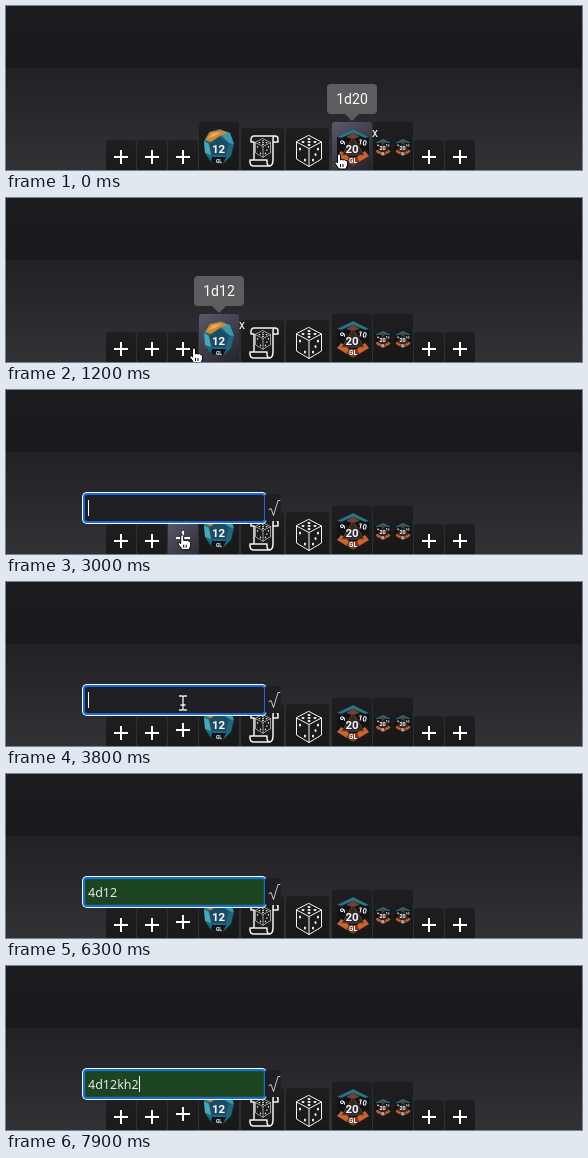
An HTML page for the animation above (8 s loop, 576 px wide and 164 px high).

```html
<!DOCTYPE html>
<html lang="en">
<head>
<meta charset="utf-8">
<title>Dice bar</title>
<style>
html, body { margin: 0; width: 100%; height: 100%; overflow: hidden; background: #1b1a1f; }
svg { display: block; width: 576px; height: 164px; font-family: Roboto, sans-serif; fill: #fff; }
.line { fill: none; stroke: #f4f4f4; stroke-linejoin: round; stroke-linecap: round; }
.num { font-weight: 700; text-anchor: middle; }
#typed { font: 12.5px "Noto Sans", sans-serif; }
</style>
</head>
<body>
<svg viewBox="0 0 576 164">
  <defs>
    <linearGradient id="top" x2="0" y2="1"><stop stop-color="#1c1b20"/><stop offset="1" stop-color="#1a191e"/></linearGradient>
    <linearGradient id="low" x2="0" y2="1"><stop stop-color="#212025"/><stop offset="1" stop-color="#323136"/></linearGradient>
    <linearGradient id="dark" x2="0" y2="1"><stop stop-color="#1f1f21"/><stop offset="1" stop-color="#161617"/></linearGradient>
    <linearGradient id="lit" x2=".5" y2="1"><stop stop-color="#5a596b"/><stop offset="1" stop-color="#25242d"/></linearGradient>

    <g id="plus"><path d="M-7 0H7M0-7V7" stroke="#fff" stroke-width="2"/></g>

    <g id="cube">
      <path class="line" d="M0-15.500 12.500-9V8L0 15.500-12.500 8V-9ZM-12.500-9 0-2.500 12.500-9M0-2.500V15.500"/>
      <ellipse cy="-9" rx="1.500" ry=".9"/><ellipse cx="-6" cy="-9" rx="1.500" ry=".9"/><ellipse cx="6" cy="-9" rx="1.500" ry=".9"/>
      <ellipse cy="-12" rx="1.500" ry=".9"/><ellipse cy="-6" rx="1.500" ry=".9"/>
      <ellipse cx="-9" cy="-2" rx="1" ry="1.500"/><ellipse cx="-4" cy="9" rx="1" ry="1.500"/>
      <ellipse cx="9" cy="-2" rx="1" ry="1.500"/><ellipse cx="6.500" cy="3.500" rx="1" ry="1.500"/><ellipse cx="4" cy="9" rx="1" ry="1.500"/>
    </g>

    <g id="scroll">
      <path class="line" stroke-width="1.500" d="M-9-8H-12V-10Q-12-14-9-14H12Q15-14 15-11V-8H10V10Q10 16 6 16H-9Q-13 16-13 12V10H4V12Q4 16 7 16M-9-8V10M10-8V-11Q10-14 12-14"/>
      <use href="#cube" transform="translate(0 -2) scale(.6)"/>
    </g>

    <g id="d12">
      <path fill="#20657c" d="M-9-15 1-18 12-14 16-3 13 9 5 17-7 15-13 6-14-6Z"/>
      <path fill="#3b98ae" d="M1-18 12-14 16-3 11-4 4-11Z"/>
      <path fill="#4aa5b8" d="M-14-6-9-3-7 8-13 6Z"/>
      <path fill="#d58531" d="M-13-7-8-15 2-17 10-14 2-11-7-5Z"/>
      <path fill="#e8b05c" d="M-10-9-5-14 3-15-3-11Z"/>
      <path fill="#1a4d63" d="M1-10 11-4 8 8-6 8-9-3Z"/>
      <path fill="#10171d" d="M-6 10 8 10 5 17-7 15Z"/>
      <text class="num" y="6" x=".5" font-size="11.500">12</text>
      <text class="num" y="15.500" x="1" font-size="5">GL</text>
    </g>

    <g id="d20">
      <path fill="#121317" d="M0-19 16-11V8L0 18-16 8V-11Z"/>
      <path fill="#2b7285" d="M0-19 16-11 12-10 0-15-12-10-16-11Z"/>
      <path fill="#6b4436" d="M0-15 7-11 0-9-7-11Z"/>
      <path fill="#c9642c" d="M-16 8-12 3-4 9-6 14ZM16 8 12 3 4 9 6 14Z"/>
      <path fill="#7c3d27" d="M-6 14-4 9H4L6 14 0 18Z"/>
      <path fill="#30262a" d="M0-11 11 7H-11Z"/>
      <path fill="none" stroke="#8a4a32" stroke-width=".7" d="M0-11 11 7H-11Z"/>
      <text class="num" x="-1" y="4.500" font-size="11.500">20</text>
      <text class="num" font-size="7.500" transform="translate(-8 -4) rotate(-60)">9</text>
      <text class="num" font-size="7.500" transform="translate(9 -3) rotate(12)">10</text>
      <text class="num" y="14.500" font-size="6.500">GL</text>
    </g>

    <g id="pair">
      <use href="#d20" transform="translate(-10) scale(.47)"/>
      <use href="#d20" transform="translate(10) scale(.47)"/>
    </g>
  </defs>

  <rect width="576" height="62" fill="url(#top)"/>
  <rect y="62" width="576" height="102" fill="url(#low)"/>
  <g id="bar"></g>

  <g id="tip">
    <path id="arrow" fill="#5d5d5f"/>
    <rect id="box" height="30" rx="4" fill="#5d5d5f"/>
    <text id="label" font-size="14" text-anchor="middle"/>
  </g>
  <text id="close" y="131" font-size="12" text-anchor="middle">x</text>

  <g id="entry">
    <g id="ring">
      <rect x="76" y="102" width="185" height="32" rx="5"/>
      <rect x="77" y="103" width="183" height="30" rx="4" fill="#176be0"/>
    </g>
    <rect id="field" x="79.500" y="105.500" width="178" height="25" rx="1.500"/>
    <rect x="259" y="104" width="16" height="27" rx="2" fill="#1f1f22"/>
    <path class="line" stroke-width=".8" d="M263 119.500 265 118.500 267.500 125.500 272 110.500H274"/>
    <text id="typed" x="82" y="123" fill="#e6e6e6"/>
    <rect id="caret" y="110" width="1" height="16"/>
  </g>

  <path id="hand" stroke="#000" stroke-width="1" stroke-linejoin="round"
    d="M-1.500 1Q0-1 1.500 1V6Q3 4.700 4 6 5.500 5 6.500 6.500 8.500 6 8.500 8V11L7 15H0L-4 9.500Q-4.500 7.500-2.800 7.800L-1.500 9ZM1.500 10V13M4 10V13"/>
  <path id="beam" class="line" stroke-width="1.300" d="M-3.500-7H-1Q0-7 0-6 0-7 1-7H3.500M0-6V6M-3.500 7H-1Q0 7 0 6 0 7 1 7H3.500M-2 2H2"/>
</svg>

<script>
const $ = id => document.getElementById(id);
const show = (id, on) => $(id).style.display = on ? "" : "none";
const set = (id, attrs) => { for (const k in attrs) $(id).setAttribute(k, attrs[k]); };
const clamp = v => Math.max(0, Math.min(1, v));

const LOOP = 8000, OPEN = 2500, FOCUS = 2600, TYPE = 4560;
const ADD = "Add new custom dice roll";

// left, top, width, icon, icon centre, tooltip
const tiles = [
  [100, 134, 30, "plus", 115, 151, ADD],
  [131, 134, 30, "plus", 146, 151, ADD],
  [162, 134, 30, "plus", 177, 151, ADD],
  [193, 116, 40, "d12", 212, 141, "1d12"],
  [235, 122, 43, "scroll", 257, 144],
  [280, 122, 43, "cube", 303, 145],
  [326, 116, 40, "d20", 347, 142, "1d20"],
  [367, 116, 40, "pair", 387, 142],
  [408, 134, 30, "plus", 423, 151, ADD],
  [439, 134, 30, "plus", 454, 151, ADD],
].map(([x, y, w, icon, cx, cy, tip]) => ({ x, y, w, icon, cx, cy, tip }));

$("bar").innerHTML = tiles.map((t, i) =>
  `<g id="tile${i}"><rect id="face${i}" x="${t.x}" y="${t.y}" width="${t.w}" height="60" rx="3"/>` +
  `<use href="#${t.icon}" transform="translate(${t.cx} ${t.cy})"/></g>`).join("");

// time, x, y of the pointer's hot spot
const path = [
  [0, 333, 148], [500, 215, 150], [700, 178, 152], [850, 181, 152],
  [1020, 201, 151], [1100, 197, 150], [1200, 188, 150], [1500, 177, 151],
  [2750, 176, 151], [3600, 177, 121],
];

function pointer(t) {
  const i = path.findIndex(p => p[0] > t);
  if (i < 0) return path[path.length - 1].slice(1);
  if (i === 0) return path[0].slice(1);
  const [t0, x0, y0] = path[i - 1], [t1, x1, y1] = path[i];
  const k = (t - t0) / (t1 - t0), e = k * k * (3 - 2 * k);
  return [x0 + (x1 - x0) * e, y0 + (y1 - y0) * e];
}

const keys = [[TYPE, "4"], [5500, "d"], [5600, "1"], [5800, "2"], [7000, "k"], [7300, "h"], [7500, "2"]];

const pen = document.createElement("canvas").getContext("2d");
function textWidth(text, font) {
  pen.font = font;
  return pen.measureText(text).width;
}

function drawTip(tile) {
  show("tip", tile && tile.tip);
  show("close", tile && tile.tip && tile.icon !== "plus");
  if (!tile || !tile.tip) return;
  const plus = tile.icon === "plus", y = plus ? 98 : 78;
  const cx = plus ? tile.cx - .5 : tile.x + tile.w / 2;
  const w = Math.round(textWidth(tile.tip, "14px Roboto, sans-serif")) + 18;
  set("arrow", { d: `M${cx - 8} ${y + 29}h16l-8 8z` });
  set("box", { x: cx - w / 2, y, width: w });
  set("label", { x: cx, y: y + 19.5 });
  $("label").textContent = tile.tip;
  set("close", { x: tile.x + tile.w + 3 });
}

function drawEntry(t) {
  show("entry", t >= OPEN);
  const green = clamp((t - TYPE) / 400);
  const blend = (from, to) => `rgb(${from.map((v, i) => Math.round(v + (to[i] - v) * green))})`;
  set("entry", { opacity: clamp((t - OPEN) / 100) });
  set("ring", { opacity: clamp((t - 2750) / 150) });
  set("field", { fill: blend([31, 31, 36], [29, 68, 33]), stroke: blend([31, 31, 36], [24, 84, 44]) });
  const done = keys.filter(k => k[0] <= t);
  const text = done.map(k => k[1]).join("");
  $("typed").textContent = text;
  const since = done.length ? done[done.length - 1][0] : FOCUS;
  set("caret", { x: Math.round(82 + textWidth(text, '12.5px "Noto Sans", sans-serif')) });
  show("caret", t >= FOCUS && Math.floor((t - since) / 500) % 2 === 0);
}

function draw(t) {
  const [x, y] = pointer(t), [hx, hy] = pointer(t - 100);
  const inField = t >= OPEN && y < 133;
  const over = inField ? -1 : tiles.findIndex(b => hx >= b.x && hx <= b.x + b.w + 1 && hy >= b.y - 3);
  tiles.forEach((b, i) => {
    const raised = b.icon === "plus" && (i === over || i === 2 && t >= OPEN);
    set("tile" + i, { transform: `translate(0 ${raised ? -3 : 0})` });
    set("face" + i, { fill: `url(#${i === over ? "lit" : "dark"})` });
  });
  drawTip(t < OPEN ? tiles[over] : null);
  drawEntry(t);
  show("hand", !inField);
  show("beam", inField && t < TYPE);
  const at = { transform: `translate(${x} ${y})` };
  set("hand", at);
  set("beam", at);
}

const start = performance.now();
function tick() {
  draw((performance.now() - start) % LOOP);
  requestAnimationFrame(tick);
}
tick();
</script>
</body>
</html>
```
